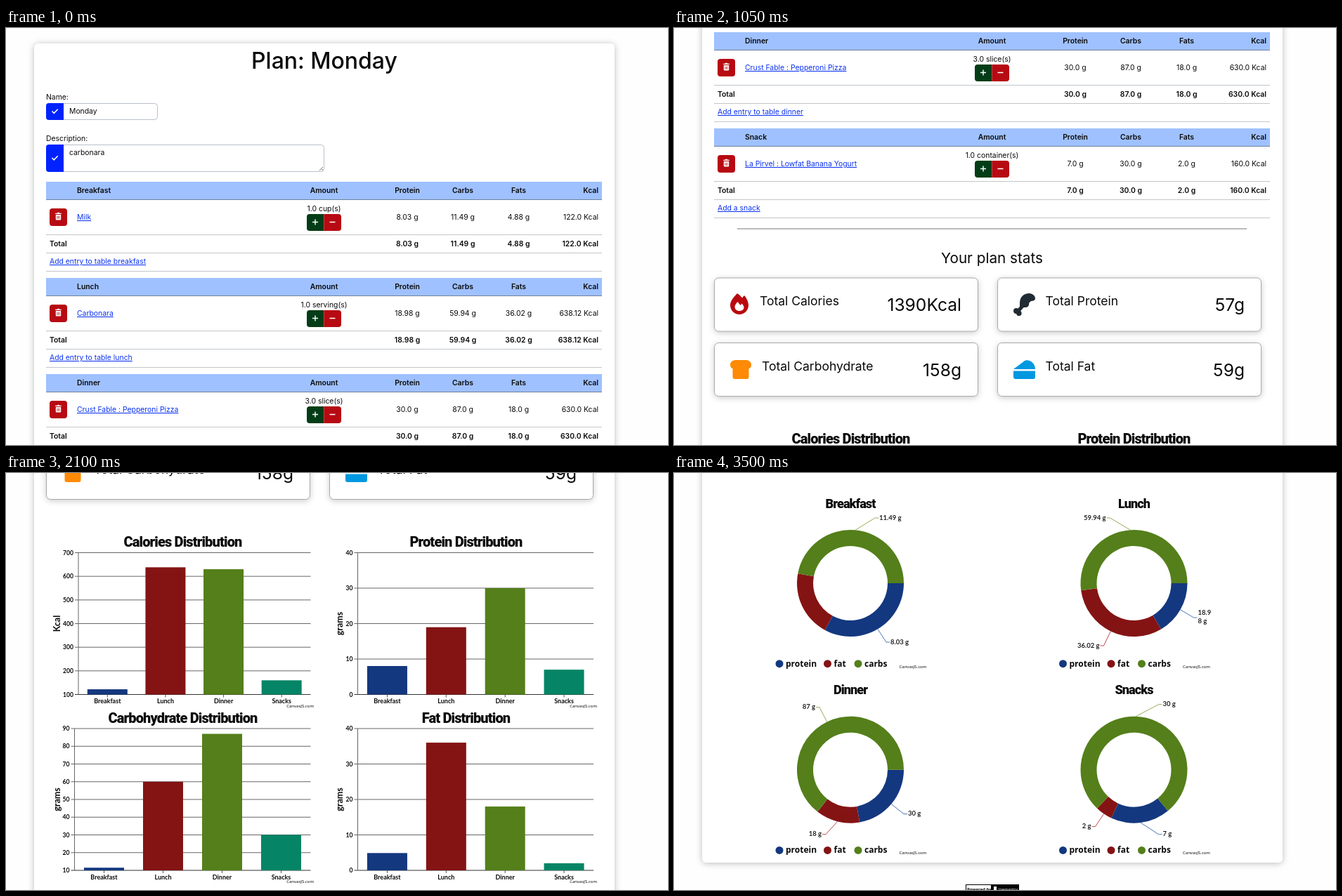
Animation of 942x594 px, one loop 3.85 s. Source, as an HTML page:

```html
<!DOCTYPE html>
<html lang="en">
<head>
<meta charset="utf-8">
<title>Meal plan</title>
<style>
html, body { margin: 0; width: 100%; height: 100%; overflow: hidden; background: #fefefe; }
svg { display: block; width: 942px; height: 594px; }
text { font: 10.4px Inter, sans-serif; fill: #0a0a0a; white-space: pre; }
.b { font-weight: 600; }
.h1 { font-size: 32px; font-weight: 500; }
.h2 { font-size: 20.7px; }
.stat { font-size: 17.5px; }
.num { font-size: 24.6px; }
.link { fill: #0b32f0; text-decoration: underline; }
.chart { font: 900 20px Roboto, sans-serif; letter-spacing: -.85px; }
.ring { font: 900 18px Roboto, sans-serif; letter-spacing: -.9px; }
.tick { font: 700 8.6px Lato, sans-serif; }
.cat { font: 700 9px Lato, sans-serif; }
.axis { font: 700 12.5px Lato, sans-serif; }
.val { font: 700 9.5px Lato, sans-serif; fill: #222; }
.key { font: 700 12px "Open Sans", sans-serif; }
.tiny { font: 6px "Noto Sans", sans-serif; }
.badge { font: 700 6.6px "Noto Sans", sans-serif; }
.light { font: 6.6px "Noto Sans", sans-serif; fill: #fff; }
.card { filter: drop-shadow(0 1px 5px #0004); }
.box { filter: drop-shadow(0 2px 4px #0003); }
</style>
</head>
<body>
<svg viewBox="0 0 942 594"><g id="page"></g></svg>
<script>
const BLUE = '#13387f', RED = '#841414', GREEN = '#547f1a', TEAL = '#058566';
const meals = ['Breakfast', 'Lunch', 'Dinner', 'Snacks'];
const protein = [8.03, 18.98, 30, 7], carbs = [11.49, 59.94, 87, 30];
const fats = [4.88, 36.02, 18, 2], kcal = [122, 638.12, 630, 160];
const page = document.getElementById('page');
let out = '';

const add = s => { out += s; };
const text = (s, x, y, cls = '', anchor = 'start', more = '') =>
  add(`<text x="${x}" y="${y}" class="${cls}" text-anchor="${anchor}" ${more}>${s}</text>`);
const mid = (s, x, y, cls) => text(s, x, y, cls, 'middle');
const end = (s, x, y, cls) => text(s, x, y, cls, 'end');
const rect = (x, y, w, h, fill, r = 0, more = '') =>
  add(`<rect x="${x}" y="${y}" width="${w}" height="${h}" rx="${r}" fill="${fill}" ${more}/>`);
const path = (d, fill, more = '') => add(`<path d="${d}" fill="${fill}" ${more}/>`);
const line = (d, color, w = 1) => path(d, 'none', `stroke="${color}" stroke-width="${w}"`);
const rule = (y, color, x1 = 57, x2 = 848) => line(`M${x1} ${y}H${x2}`, color);
const at = (x, y, draw) => { add(`<g transform="translate(${x} ${y})">`); draw(); add('</g>'); };

function field(y, w, h, label, value) {
  text(label, 57, y - 5);
  rect(57.5, y + .5, w - 1, h - 1, '#fff', 4, 'stroke="#b9c0c9"');
  path(`M82 ${y}H61a4 4 0 0 0-4 4v${h - 8}a4 4 0 0 0 4 4H82z`, '#0022ff');
  line(`M65.5 ${y + h / 2 - .5}l2.8 2.8 5.4-5.6`, '#fff', 1.6);
  text(value, 90, y + 15);
}

function table(i) {
  const cols = [571, 650, 729.5];
  const grams = [protein, carbs, fats].map(a => (a[i] % 1 ? a[i] : a[i].toFixed(1)) + ' g');
  const energy = (i === 1 ? kcal[i] : kcal[i].toFixed(1)) + ' Kcal';
  const names = ['Milk', 'Carbonara', 'Crust Fable : Pepperoni Pizza', 'La Pirvel : Lowfat Banana Yogurt'];
  const units = ['1.0 cup(s)', '1.0 serving(s)', '3.0 slice(s)', '1.0 container(s)'];
  const links = ['Add entry to table breakfast', 'Add entry to table lunch', 'Add entry to table dinner', 'Add a snack'];
  at(0, 219 + 137 * i, () => {
    rect(57, 0, 791, 25, '#9fc1ff');
    rule(25.5, '#6f829f');
    text(i === 3 ? 'Snack' : meals[i], 101, 16, 'b');
    mid('Amount', 452.5, 16, 'b');
    ['Protein', 'Carbs', 'Fats'].forEach((s, k) => mid(s, cols[k], 16, 'b'));
    end('Kcal', 843, 16, 'b');

    rect(62, 38, 25, 25, '#b70a12', 4);
    path('M70.2 46h8.6v-1.3h-2.6l-.6-.9h-2.2l-.6.9h-2.6zM70.8 47h7.4v6.5q0 1-1 1h-5.4q-1 0-1-1z', '#fff');
    line('M72.8 48.6v4.3M74.5 48.6v4.3M76.2 48.6v4.3', '#b70a12', .7);
    text(names[i], 101, 54, 'link');
    mid(units[i], 452.5, 42);
    path('M452.5 46H432a4 4 0 0 0-4 4v16a4 4 0 0 0 4 4h20.5z', '#033d17');
    path('M452.5 46H473a4 4 0 0 1 4 4v16a4 4 0 0 1-4 4h-20.5z', '#b70a12');
    line('M436 57.5h8M440 53.5v8M460.5 57.5h8', '#fff', 1.4);
    for (const [y, cls] of [[54, ''], [91.5, 'b']]) {
      grams.forEach((s, k) => mid(s, cols[k], y, cls));
      end(energy, 843, y, cls);
    }
    text('Total', 62, 91.5, 'b');
    text(links[i], 62, 117, 'link');
    [75.5, 101.5, 127.5].forEach(y => rule(y, '#c2c6ca'));
  });
}

const icons = [
  () => {
    path('M10 0C13 2 15 4 17 6.5 18 5 19 4 20 3c3 3 6 9 6 14 0 7-6 13-13 13S0 24 0 17C0 11 5 5 10 0z', '#b9090f');
    path('M13 25c-4 0-6.5-2.5-6.5-6 0-2 1.5-4 4-7l4 5 2-2.5c2 2 3 4 3 5.5 0 3-3 5-6.5 5z', '#fff');
  },
  () => {
    path('M9 14C9 5 15 0 22 0c5 0 9 3 9 7 0 2-1 3-2.5 3.5C24 10.5 22 13 22 16c0 2-2 4-5 4h-4l-4 3z', '#212b33');
    line('M5 27l9-10', '#212b33', 5);
    path('M4 21a4 4 0 1 0 .1 8 3.8 3.8 0 1 0 4-4.5A4 4 0 0 0 4 21z', '#212b33');
  },
  () => path('M8 0H22c5 0 8 3 8 7 0 3-2 5-3.5 5V24a3 3 0 0 1-3 3H6.5a3 3 0 0 1-3-3V12C2 12 0 10 0 7 0 3 3 0 8 0z', '#ff8a05'),
  () => path('M0 13L16 1Q18 0 20 .3C26 1 31 6 31 13zM0 15.5H31V24a3 3 0 0 1-3 3H3a3 3 0 0 1-3-3z', '#0098e0')
];

function stat(i, label, value) {
  const right = i % 2, low = i > 1;
  at(right ? 460 : 57, low ? 935 : 842.5, () => {
    rect(.5, .5, 375, 76, '#fff', 6, 'stroke="#a9a9a9" class="box"');
    at(23, low ? 25 : 22.5, icons[i]);
    text(label, i === 2 ? 68 : right ? 68.5 : 65, 39.5, 'stat');
    end(value, 352, 47.5, 'num');
  });
}

// Column chart; y is the top of the plot, 202 px high.
function columns(title, unit, data, left, right, y, lo, hi, step, unitX) {
  const h = 202, cx = right < 500 ? 251.5 : 654.5;
  const pos = v => h - (v - lo) / (hi - lo) * h;
  at(0, y, () => {
    mid(title, cx, -8.5, 'chart');
    for (let v = lo; v <= hi; v += step) {
      rule(pos(v), v === lo ? '#333' : '#666', left - 5, right);
      end(v, left - 7, pos(v) + 3, 'tick');
    }
    line(`M${left} 0V${h}`, '#666');
    data.forEach((v, i) => {
      const x = left + (right - left) * (i + .5) / 4;
      rect(x - 28.5, pos(v), 57, h - pos(v), [BLUE, RED, GREEN, TEAL][i]);
      line(`M${x} ${h}v4`, '#555');
      mid(meals[i], x, h + 12.5, 'cat');
    });
    text(unit, 0, 0, 'axis', 'middle', `transform="translate(${unitX} 101) rotate(-90)"`);
    end('CanvasJS.com', right < 500 ? 438 : 841, h + 18, 'tiny');
  });
}

// Ring chart; each label is [slice, elbow x, elbow y, lines of text], relative to the centre.
function ring(i, start, labels) {
  const parts = [protein[i], fats[i], carbs[i]], colors = [BLUE, RED, GREEN];
  const total = parts.reduce((a, b) => a + b);
  const pt = (r, a) => `${r * Math.cos(a)} ${r * Math.sin(a)}`;
  at(i % 2 ? 654.5 : 251, i < 2 ? 1802 : 2067.7, () => {
    mid(meals[i], 0, -107.5, 'ring');
    let a = start * Math.PI / 180;
    const mids = parts.map((v, k) => {
      const b = a + v / total * 2 * Math.PI, big = +(b - a > Math.PI), m = (a + b) / 2;
      path(`M${pt(76, a)}A76 76 0 ${big} 1 ${pt(76, b)}L${pt(53, b)}A53 53 0 ${big} 0 ${pt(53, a)}z`, colors[k]);
      a = b;
      return m;
    });
    for (const [k, x, y, ...rows] of labels) {
      const dir = Math.sign(x);
      line(`M${pt(76, mids[k])}L${x} ${y}h${5 * dir}`, ['#4a77b4', '#c0474d', '#94ad58'][k]);
      rows.forEach((s, n) => text(s, x + 6 * dir, y + 2.5 + (rows.length > 1 ? n * 11.5 - 6.5 : 0),
        'val', dir > 0 ? 'start' : 'end'));
    }
    ['protein', 'fat', 'carbs'].forEach((s, k) => {
      const x = [-101, -32.5, 11][k];
      add(`<circle cx="${x}" cy="114.7" r="5.5" fill="${colors[k]}"/>`);
      text(s, x + 9, 118.5, 'key');
    });
    text('CanvasJS.com', 69.5, 120.5, 'tiny');
  });
}

rect(40, 22, 826, 2178, '#fff', 6, 'class="card"');
mid('Plan: Monday', 453, 58, 'h1');
field(107, 159, 24, 'Name:', 'Monday');
field(166, 396, 39, 'Description:', 'carbonara');
line('M446 203l5-5M449 203l2-2', '#777');
meals.forEach((_, i) => table(i));

rule(773, '#777', 90, 815);
mid('Your plan stats', 452.5, 822, 'h2');
stat(0, 'Total Calories', '1390Kcal');
stat(1, 'Total Protein', '57g');
stat(2, 'Total Carbohydrate', '158g');
stat(3, 'Total Fat', '59g');

columns('Calories Distribution', 'Kcal', kcal, 103, 433.5, 1087.5, 100, 700, 100, 77);
columns('Protein Distribution', 'grams', protein, 500.5, 836, 1087.5, 0, 40, 10, 479);
columns('Carbohydrate Distribution', 'grams', carbs, 97.5, 433.5, 1338, 10, 90, 10, 77);
columns('Fat Distribution', 'grams', fats, 500.5, 836, 1338, 0, 40, 10, 479);

rule(1589, '#777', 90, 815);
mid('Macro distribution for each meal:', 453, 1638, 'h2');
ring(0, 0, [[0, 51, 84, '8.03 g'], [2, 35, -93, '11.49 g']]);
ring(1, 0, [[0, 85, 49, '18.9', '8 g'], [1, -43, 89, '36.02 g'], [2, -34, -93, '59.94 g']]);
ring(2, 0, [[0, 76, 63, '30 g'], [1, -35, 92, '18 g'], [2, -44, -89, '87 g']]);
ring(3, 50.5, [[0, 35, 92, '7 g'], [1, -55, 81, '2 g'], [2, 35, -93, '30 g']]);

rect(415.5, 2231.5, 75, 12, '#fff', 0, 'stroke="#000"');
rect(451, 2231, 40, 13, '#000');
text('Powered by', 417, 2239.5, 'badge', 'start', 'style="font-size:6px"');
rect(455, 2234, 4, 5, '#fff');
text('lowpantry', 462, 2239.5, 'light', 'start', 'style="font-size:5.8px"');
page.innerHTML = out;

const scroll = [0, 139, 348, 487, 626, 765, 974, 1183, 1461, 1600, 1645];
function frame() {
  const y = scroll[Math.floor(performance.now() % 3850 / 350)];
  page.setAttribute('transform', `translate(0 ${-y})`);
  requestAnimationFrame(frame);
}
frame();
</script>
</body>
</html>
```
